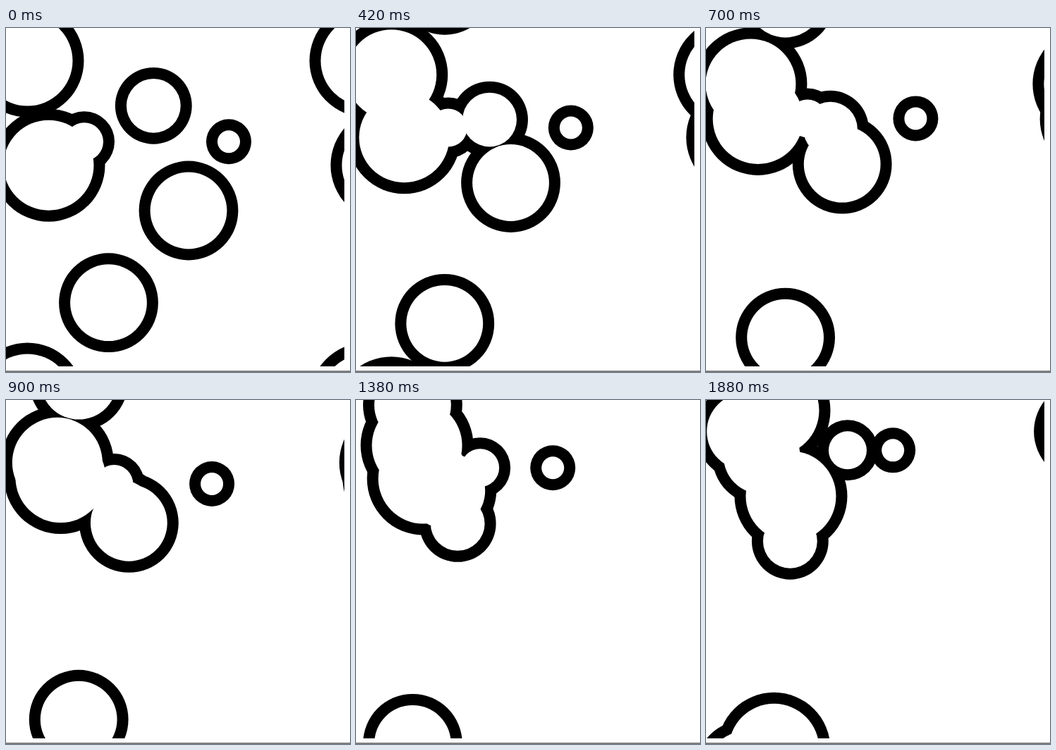
These frames come from a looping animation (488x488 px, 1.9 s). An HTML page:

```html
<!DOCTYPE html>
<html lang="en">
<head>
<meta charset="utf-8">
<title>Drifting rings</title>
<style>
  html, body { margin: 0; width: 100%; height: 100%; overflow: hidden; background: #fff; }
  svg { display: block; width: 100vw; height: 100vh; }
</style>
</head>
<body>
<svg id="stage" viewBox="0 0 488 488">
  <defs>
    <clipPath id="field"><rect width="480" height="480"/></clipPath>
  </defs>
  <rect width="488" height="488" fill="#fff"/>
  <g id="rings" clip-path="url(#field)"></g>
  <rect y="486" width="488" height="2" fill="#808080"/>
</svg>
<script>
const LOOP = 1900, STEP = 20, SIZE = 480, LINE = 16;

// Starting centre, outer radius and drift direction of each bubble.
const bubble = (x, y, r, dx, dy) => ({ x, y, r, dx, dy });
const bubbles = [
  bubble(30.5, 46.5, 80, 1, 1),
  bubble(60.5, 194.7, 80, 0.4, -2),
  bubble(111, 161.3, 43, 1, -1),
  bubble(209.3, 110.3, 54.4, -1, 1),
  bubble(316, 161.3, 32, -0.565, -1),
  bubble(259, 259, 70.4, -2, -2),
  bubble(145.5, 389.7, 70.4, -1, 1.5)
];

// Steady drift that quickens slightly near the end of the loop.
const travelled = t => 0.047 * t + 1.7 * (t / LOOP) ** 6;
const wrap = v => ((v % SIZE) + SIZE) % SIZE;

function add(parent, name, attrs) {
  const node = document.createElementNS("http://www.w3.org/2000/svg", name);
  for (const key in attrs) node.setAttribute(key, attrs[key]);
  return parent.appendChild(node);
}

const defs = document.querySelector("#stage defs");
const rings = document.getElementById("rings");

// All black discs lie below all white ones, so touching bubbles merge.
// Nine shifted copies of a layer make the field wrap around.
function makeLayer(id, fill, inset) {
  const group = add(defs, "g", { id, fill });
  const discs = bubbles.map(b => add(group, "circle", { r: b.r - inset }));
  for (const x of [-SIZE, 0, SIZE])
    for (const y of [-SIZE, 0, SIZE]) add(rings, "use", { href: "#" + id, x, y });
  return discs;
}

const layers = [makeLayer("outer", "#000", 0), makeLayer("inner", "#fff", LINE)];

function draw(time) {
  const d = travelled(Math.floor((time % LOOP) / STEP) * STEP);
  bubbles.forEach((b, i) => {
    for (const discs of layers) {
      discs[i].setAttribute("cx", wrap(b.x + b.dx * d));
      discs[i].setAttribute("cy", wrap(b.y + b.dy * d));
    }
  });
}

const start = performance.now();
function tick() {
  draw(performance.now() - start);
  requestAnimationFrame(tick);
}
tick();
</script>
</body>
</html>
```
